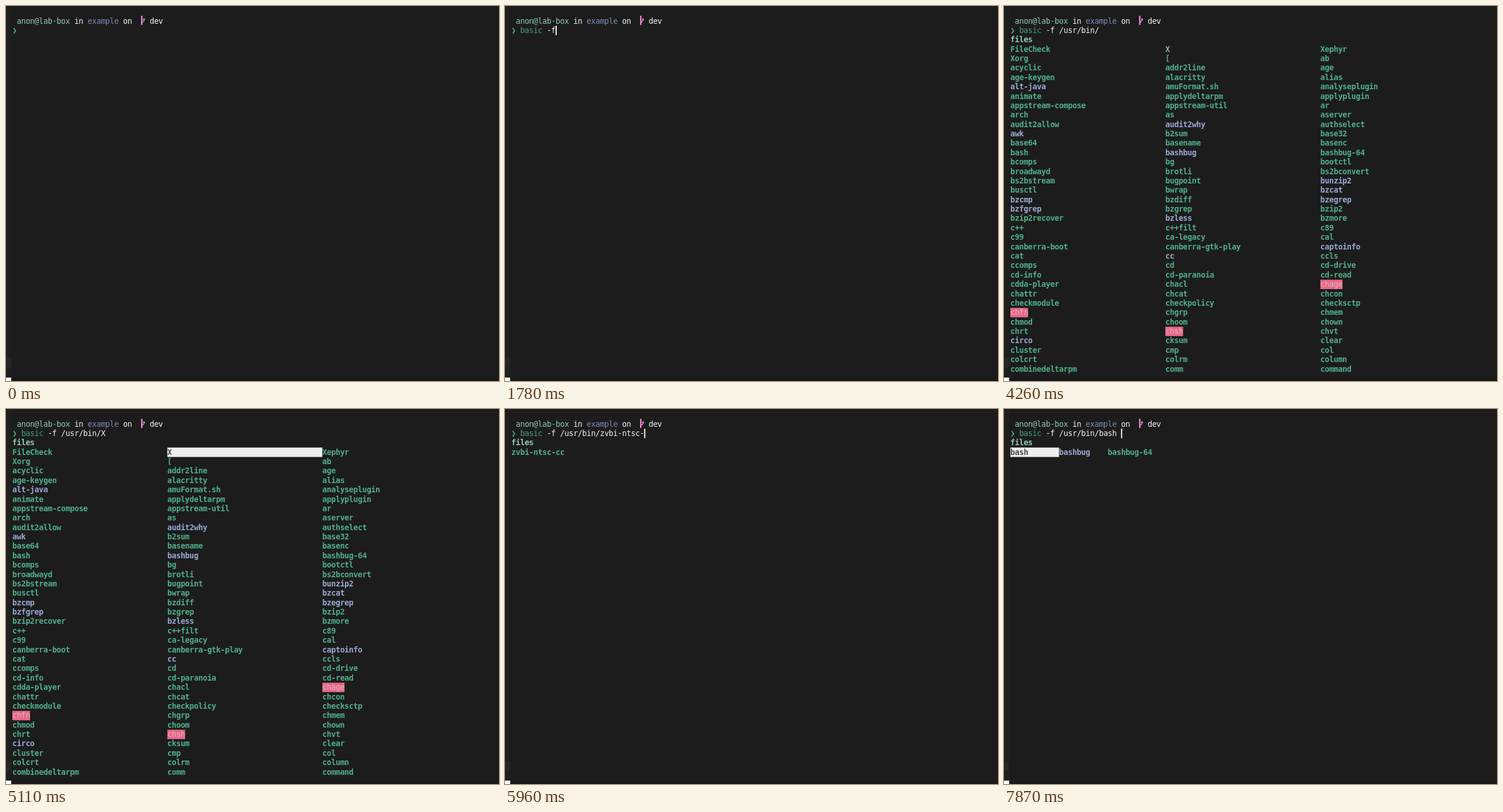
An HTML page for the animation above (8 s loop, 858 px wide and 653 px high).

```html
<!DOCTYPE html>
<html lang="en">
<head>
<meta charset="utf-8">
<title>Terminal completion</title>
<style>
html, body { margin: 0; width: 100%; height: 100%; overflow: hidden; background: #1c1c1c; }
#stage { position: absolute; left: 0; top: 0; width: 858px; height: 653px; overflow: hidden; background: #1c1c1c; }
#stage > i { position: absolute; }
#term {
  position: absolute; left: 10.8px; top: 17.5px; width: 880px; height: 646px;
  transform: scale(.9635); transform-origin: 0 0;
  font: 14px/17px "DejaVu Sans Mono", monospace;
  letter-spacing: calc(8px - .602em);
  font-variant-ligatures: none;
}
#term span { position: absolute; height: 17px; white-space: pre; }
.name, .head { color: #8fc9b1; }
.dir { color: #7a8bb0; }
.text { color: #f4f4f4; }
.cmd { color: #489a80; }
.mark { color: #45b08c; }
.head, .exec, .link, .fold { font-weight: 700; }
.exec { color: #4fae8b; }
.link { color: #98a8d3; }
.fold { color: #477ab3; }
.suid { color: #d9b9b4; background: #e8668a; }
.pick { color: #4a4a4a; background: #eeeeee; font-weight: 700; }
.cursor { width: 2px; background: #fff; }
#branch { position: absolute; left: 234px; top: 17px; }
</style>
</head>
<body>
<div id="stage">
  <i style="left:0;top:0;width:9px;height:653px;background:#1f1f1f"></i>
  <i style="left:0;top:613px;width:9px;height:16px;background:#262626"></i>
  <i style="left:9px;top:649px;width:849px;height:4px;background:#191919"></i>
  <i style="left:0;top:647px;width:9px;height:6px;background:#fff"></i>
  <div id="term"></div>
  <svg id="branch" width="10" height="17" fill="none" stroke="#f08cd2">
    <path d="M2.3 0V16" stroke-width="2.4"/>
    <path d="M2.5 12L6.3 8.5V5" stroke-width="1.5"/>
    <path d="M3.8 7L6.2 4L8.4 7Z" fill="#f08cd2" stroke="none"/>
  </svg>
</div>
<script>
const CELL = 8, ROW = 17, LOOP = 8000;
const term = document.getElementById("term");

// Suffixes: "/" folder, "@" link, "!" setuid
const split = s => s.trim().split(/\s+/);
const usr = split(`bin/ etc/ games/ i686-w64-mingw32/ include/
  lib/ lib64/ libexec/ local.orig/ local/
  sbin/ share/ src/ tmp@ x86_64-w64-mingw32/`);
const bin = split(`FileCheck X@ Xephyr Xorg [ ab acyclic addr2line age
  age-keygen alacritty alias alt-java@ amuFormat.sh analyseplugin
  animate applydeltarpm applyplugin appstream-compose appstream-util ar
  arch as aserver audit2allow audit2why@ authselect awk@ b2sum base32
  base64 basename basenc bash bashbug@ bashbug-64 bcomps bg bootctl
  broadwayd brotli bs2bconvert bs2bstream bugpoint bunzip2@
  busctl bwrap bzcat@ bzcmp@ bzdiff bzegrep@ bzfgrep@ bzgrep bzip2
  bzip2recover bzless@ bzmore c++ c++filt c89 c99 ca-legacy cal
  canberra-boot canberra-gtk-play captoinfo@ cat cc@ ccls
  ccomps cd cd-drive cd-info cd-paranoia cd-read cdda-player chacl chage!
  chattr chcat chcon checkmodule checkpolicy checksctp chfn! chgrp chmem
  chmod choom chown chrt chsh! chvt circo@ cksum clear
  cluster cmp col colcrt colrm column combinedeltarpm comm command`);
const zvbi = split("zvbi-atsc-cc zvbi-chains zvbi-ntsc-cc");

const menu = (items, width, cols, row = 3) => ({ items, width, cols, row });
const starts = (items, p) => items.filter(s => s.startsWith(p));
const usrMenu = menu(usr, 21, 5);
const binMenu = menu(bin, 35, 3);
const usrOnly = menu(["usr/"], 21, 5);
const binOnly = menu(["bin/"], 21, 5);
const bMenu = menu(starts(bin, "b"), 13, 8);
const basMenu = menu(starts(bin, "bas"), 11, 9);
const bashMenu = menu(starts(bin, "bash"), 11, 9);
const ntscMenu = menu(["zvbi-ntsc-cc"], 13, 8);
const zvbiMenu = menu(zvbi, 14, 7);
const lastMenu = menu(["zvbi-ntsc-cc"], 35, 3, 36);

const F = "basic -f ", U = F + "/usr/", B = U + "bin/";
const HIDE = true;

// time, typed line, menu, picked entry, cursor hidden
const steps = [
  [0, "", null, "", HIDE],
  [200, ""],
  [930, "b"], [990, "ba"], [1050, "bas"],
  [1250, "basi"], [1380, "basic"],
  [1580, "basic -"], [1780, "basic -f"], [1840, F],
  [2160, F + "/"],
  [2490, F + "/u", usrOnly], [2600, F + "/us", usrOnly], [2700, F + "/usr", usrOnly],
  [2810, U, usrMenu],
  [3010, U + "b", binOnly], [3210, U + "bi", binOnly], [3330, U + "bin", binOnly],
  [3530, B, binMenu], [4260, B, binMenu, "", HIDE],
  [4660, B + "FileCheck ", binMenu, "FileCheck"],
  [4850, B + "X ", binMenu, "X"], [5110, B + "X ", binMenu, "X", HIDE],
  [5310, B + "FileCheck ", binMenu, "FileCheck"],
  [5405, B, binMenu],
  [5500, B + "zvbi-ntsc-cc ", lastMenu, "zvbi-ntsc-cc"],
  [5960, B + "zvbi-ntsc-", ntscMenu], [6160, B + "zvbi-ntsc", ntscMenu],
  [6360, B + "zvbi-", zvbiMenu], [6690, B + "zvbi", zvbiMenu],
  [7010, B, binMenu],
  [7340, B + "b", bMenu], [7540, B + "bas", basMenu], [7670, B + "bash", bashMenu],
  [7870, B + "bash ", bashMenu, "bash"]
];

function put(col, row, text, kind, width) {
  const el = document.createElement("span");
  el.className = kind;
  el.textContent = text;
  el.style.left = col * CELL + "px";
  el.style.top = row * ROW + "px";
  if (width) el.style.width = width * CELL + "px";
  term.append(el);
}

function drawMenu({ items, width, cols, row }, picked) {
  put(0, 2, "files", "head");
  items.forEach((item, i) => {
    const kind = { "/": "fold", "@": "link", "!": "suid" }[item.at(-1)] || "exec";
    const text = item.replace(/[@!]$/, "");
    const on = text === picked;
    put(i % cols * width, row + Math.floor(i / cols), text, on ? "pick" : kind, on && width);
  });
}

function draw([, line, list, picked, hidden]) {
  term.textContent = "";
  put(1, 0, "anon@lab-box", "name");
  put(14, 0, "in", "text");
  put(17, 0, "example", "dir");
  put(25, 0, "on", "text");
  put(31, 0, "dev", "text");
  put(0, 1, "❯", "mark");
  put(2, 1, line.slice(0, 5), "cmd");
  put(7, 1, line.slice(5), "text");
  if (list) drawMenu(list, picked);
  if (!hidden) put(2 + line.length, 1, "", "cursor");
}

let shown;
function frame(now) {
  const t = now % LOOP;
  const step = steps.findLast(s => s[0] <= t);
  if (step !== shown) draw(shown = step);
  requestAnimationFrame(frame);
}
draw(shown = steps[0]);
requestAnimationFrame(frame);
</script>
</body>
</html>
```
